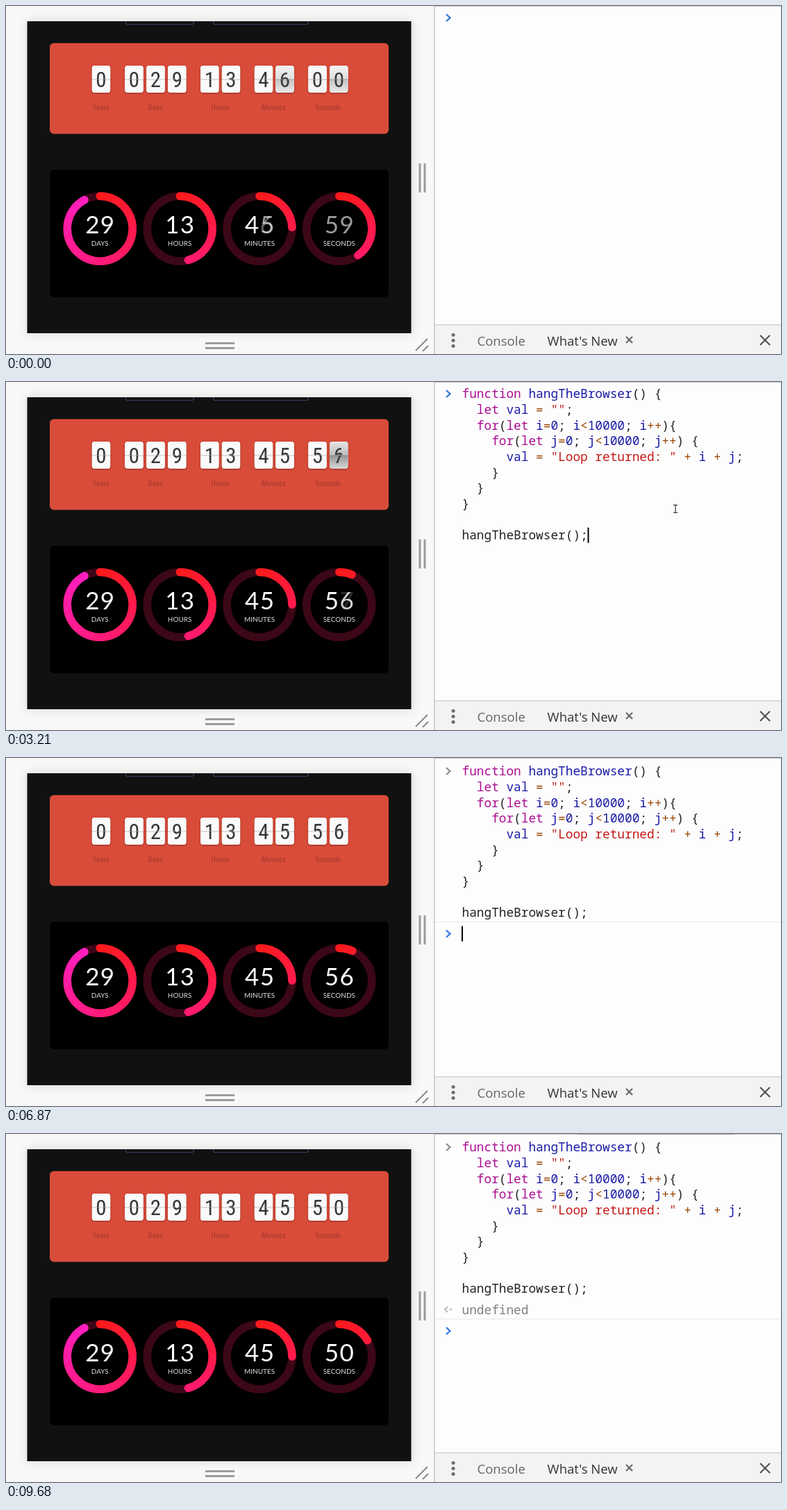
Write an HTML page with a canvas that moves like this. It is 1116x502 px and loops after 9720 ms.

```html
<!DOCTYPE html>
<html lang="en">
<head>
<meta charset="utf-8">
<title>Countdown and console</title>
<style>
  html, body { margin: 0; height: 100%; overflow: hidden; background: #f8f8f6; }
  canvas { display: block; }
</style>
</head>
<body>
<canvas id="stage" width="1116" height="502"></canvas>
<script>
const ctx = document.getElementById('stage').getContext('2d');
const LOOP = 9720;
const FADE = 380;        // ring and digit cross-fade
const FLIP = 360;        // one card flip
const HINGE = 105.5;

// When the countdown changes, and the seconds it then shows.
const TICKS = [[-230, 59], [860, 58], [1890, 57], [2900, 56], [7030, 52], [7930, 51], [8940, 50]];

// Console events.
const FOCUS = 1250, PASTE = 2000, ENTER = 3580, RETURN = 7000;

const CODE = `function hangTheBrowser() {
  let val = "";
  for(let i=0; i<10000; i++){
    for(let j=0; j<10000; j++) {
      val = "Loop returned: " + i + j;
    }
  }
}

hangTheBrowser();`.split('\n');
const LINE = 22.67;
const MONO = '17.77px "Noto Sans Mono", monospace';
const NARROW = '"Roboto Condensed", "Open Sans Condensed", "Liberation Sans Narrow", "Noto Sans Condensed", Roboto, sans-serif';

// Groups: string, keyword, variable or number, operator; the rest is plain.
const TOKEN = /("[^"]*")|\b(function|let|for)\b|(\b(?:val|i|j|\d+)\b|hangTheBrowser(?=\(\) \{))|([=<+]+)|\w+|[^\s]/g;
const TOKEN_COLORS = ['#c41a16', '#ab0d90', '#1a1aa6', '#994500'];

const clamp = v => Math.min(1, Math.max(0, v));
const mix = (a, b, p) => a + (b - a) * p;
const easeInOut = p => p < .5 ? 4 * p ** 3 : 1 - (2 - 2 * p) ** 3 / 2;
const digits = n => String(n).padStart(2, '0');

function box(x, y, w, h, r, fill) {
  ctx.fillStyle = fill;
  ctx.beginPath();
  ctx.roundRect(x, y, w, h, r);
  ctx.fill();
}

function line(points, color, width = 1) {
  ctx.strokeStyle = color;
  ctx.lineWidth = width;
  ctx.beginPath();
  points.forEach(([x, y]) => ctx.lineTo(x, y));
  ctx.stroke();
}

function text(str, x, y, font, color, align = 'left') {
  ctx.font = font;
  ctx.fillStyle = color;
  ctx.textAlign = align;
  ctx.fillText(str, x, y);
}

function narrowText(str, x, y, size, color) {
  ctx.fontStretch = 'condensed';
  text(str, x, y, `condensed ${size}px ${NARROW}`, color, 'center');
  ctx.fontStretch = 'normal';
}

function shadow(color, blur, y = 0) {
  ctx.shadowColor = color;
  ctx.shadowBlur = blur;
  ctx.shadowOffsetY = y;
}

function countdownAt(t) {
  const i = TICKS.findLastIndex(([at]) => at <= t);
  return {
    age: t - TICKS[i][0],
    now: { min: 45, sec: TICKS[i][1] },
    old: i ? { min: 45, sec: TICKS[i - 1][1] } : { min: 46, sec: 0 }
  };
}

function drawPage() {
  ctx.fillStyle = '#f8f8f6';
  ctx.fillRect(0, 0, 617, 502);
  shadow('rgba(0,0,0,.14)', 14);
  box(30.5, 22, 553, 450, 0, '#111');
  shadow('transparent', 0);

  // Lower edges of two outlined buttons scrolled under the top.
  ctx.save();
  ctx.beginPath();
  ctx.rect(30, 22, 554, 20);
  ctx.clip();
  ctx.strokeStyle = '#3a3a60';
  ctx.lineWidth = 1.2;
  for (const [x, w] of [[172, 98.5], [298.5, 137]]) {
    ctx.beginPath();
    ctx.roundRect(x, 0, w, 26.5, 3);
    ctx.stroke();
  }
  ctx.restore();

  box(63, 53.5, 488, 131, 6, '#da4c3a');
  box(63, 236, 488, 184, 6, '#000');

  for (const d of [0, 7]) {
    box(594.5 + d, 227, 3, 42, 0, '#9b9b9b');
    box(287, 485 + d, 42, 3, 0, '#9b9b9b');
  }
  line([[590, 497], [607, 480]], '#888', 2);
  line([[600, 498], [608, 490]], '#888', 2);
}

// One half of a card, folded towards the hinge by `fold` (1 = flat).
function cardHalf(char, x, top, fold, shade) {
  ctx.save();
  ctx.translate(x, HINGE);
  ctx.scale(1, fold);
  ctx.beginPath();
  ctx.rect(-13.5, top ? -20 : 0, 27, 20);
  ctx.clip();
  box(-13.2, -19.5, 26.4, 39, 4, '#fafafa');
  narrowText(char, 0, 11.5, 31, '#383838');
  if (shade > 0) {
    const g = ctx.createLinearGradient(0, 0, 0, top ? -20 : 20);
    g.addColorStop(0, `rgba(60,60,60,${shade})`);
    g.addColorStop(1, `rgba(60,60,60,${shade * .3})`);
    box(-13.2, -19.5, 26.4, 39, 4, g);
  }
  ctx.restore();
}

function card(x, now, old, age) {
  const p = now === old ? 1 : easeInOut(clamp(age / FLIP));
  const shade = p < 1 ? .55 * Math.sqrt(Math.sin(Math.PI * p)) : 0;
  const flap = Math.abs(Math.cos(Math.PI * p));
  shadow('rgba(0,0,0,.35)', 3, 1);
  box(x - 13.2, HINGE - 19.5, 26.4, 39, 4, '#fafafa');
  shadow('transparent', 0);
  cardHalf(now, x, true, 1, shade * .6);
  cardHalf(p < 1 ? old : now, x, false, 1, shade);
  if (p < .5) cardHalf(old, x, true, flap, shade * .5);
  else if (p < 1) cardHalf(now, x, false, flap, shade * .4);
  line([[x - 14, HINGE + .5], [x + 14, HINGE + .5]], 'rgba(70,70,70,.3)');
}

function drawFlipClock({ age, now, old }) {
  const groups = [
    ['Years', 136.5, [137], '0', '0'],
    ['Days', 215, [184.5, 215.5, 246.3], '029', '029'],
    ['Hours', 308, [293.3, 324], '13', '13'],
    ['Minutes', 385.5, [371, 401.5], digits(now.min), digits(old.min)],
    ['Seconds', 463.5, [448.5, 479.3], digits(now.sec), digits(old.sec)]
  ];
  for (const [label, x, places, fresh, stale] of groups) {
    places.forEach((cx, i) => {
      const delay = i < places.length - 1 ? 200 : 130;
      card(cx, fresh[i], stale[i], age - delay);
    });
    narrowText(label, x, 150, 11, '#a03a2e');
  }
}

function ring(cx, label, now, old, share, p) {
  const cy = 321.2, r = 47, start = -Math.PI / 2;
  const arc = (angle, style) => {
    ctx.strokeStyle = style;
    ctx.lineWidth = 11.5;
    ctx.beginPath();
    ctx.arc(cx, cy, r, start, start + angle);
    ctx.stroke();
  };
  arc(2 * Math.PI, '#3c0716');
  // The gradient starts before the round cap so that the cap stays red.
  const g = ctx.createConicGradient(start - .2, cx, cy);
  g.addColorStop(0, '#ff1a1a');
  g.addColorStop(.06, '#ff1a20');
  g.addColorStop(.5, '#ff1a74');
  g.addColorStop(1, '#ff1fc8');
  ctx.lineCap = 'round';
  arc(share * 2 * Math.PI, g);
  ctx.lineCap = 'butt';

  const fresh = digits(now), stale = digits(old);
  const tensChange = fresh[0] !== stale[0];
  [-10.8, 10.8].forEach((dx, i) => {
    const put = (char, alpha) => {
      ctx.globalAlpha = alpha;
      text(char, cx + dx, 327.5, '35px Lato, sans-serif', '#fff', 'center');
    };
    if (fresh[i] === stale[i]) return put(fresh[i], 1);
    if (!tensChange) put(stale[i], 1 - p);
    put(fresh[i], p);
  });
  ctx.globalAlpha = 1;
  text(label, cx, 345.5, '10px Lato, sans-serif', '#ddd', 'center');
}

function drawRings({ age, now, old }) {
  const p = clamp(age / FADE);
  const sixtieth = n => (60 - n) / 60;
  ring(135.2, 'DAYS', 29, 29, 332 / 360, 1);
  ring(250.2, 'HOURS', 13, 13, 11 / 24, 1);
  ring(365, 'MINUTES', now.min, old.min, mix(sixtieth(old.min), sixtieth(now.min), p), p);
  ring(479.8, 'SECONDS', now.sec, old.sec, mix(sixtieth(old.sec), sixtieth(now.sec), p), p);
}

function chevron(y, color) {
  line([[634, y - 5], [639.5, y], [634, y + 5]], color, 2.3);
}

function drawCode(baseline) {
  ctx.font = MONO;
  const advance = ctx.measureText('0').width;
  CODE.forEach((row, i) => {
    for (const m of row.matchAll(TOKEN)) {
      const kind = m.slice(1).findIndex(Boolean);
      text(m[0], 656.5 + m.index * advance, baseline + i * LINE, MONO, TOKEN_COLORS[kind] || '#222');
    }
  });
}

function caret(t, since, x, y) {
  if ((t - since) % 1000 < 500) box(x, y, 2, 22, 0, '#000');
}

function cross(x, y, r, color) {
  line([[x - r, y - r], [x + r, y + r]], color, 2.2);
  line([[x - r, y + r], [x + r, y - r]], color, 2.2);
}

function drawConsole(t) {
  ctx.fillStyle = '#fdfdfe';
  ctx.fillRect(617, 0, 499, 502);

  if (t < ENTER) {
    chevron(17, '#2f76e0');
    if (t >= PASTE) {
      drawCode(23.4);
      caret(t, PASTE, 837.5, 210);
    } else if (t >= FOCUS) caret(t, FOCUS, 656, 6);
  } else {
    chevron(19, '#8c8c8c');
    drawCode(25.2);
    const done = t >= RETURN;
    const rule = done ? 267 : 236.5;
    line([[618, rule], [1116, rule]], '#e9e9e6');
    if (done) {
      line([[636, 249], [632, 253], [636, 257]], '#b5b5b5', 1.8);
      box(639, 252, 3, 2.4, 0, '#b5b5b5');
      text('undefined', 656.5, 260, MONO, '#808080');
    }
    chevron(done ? 284 : 253.5, '#2f76e0');
    caret(t, done ? RETURN : ENTER, 656, done ? 273 : 242.5);
  }

  box(617, 460, 499, 42, 0, '#f3f3f1');
  line([[617, 459.8], [1116, 459.8]], '#cbcbcb', 1.3);
  line([[617, .5], [1116, .5]], '#ccc');
  line([[617, 0], [617, 502]], '#c6c6c6', 1.5);
  if (t > 8600) line([[823, .5], [1049, .5]], '#a5a5a5');

  for (const y of [474.5, 482.5, 490.5]) box(641.5, y - 2.5, 5, 5, 2.5, '#6c6c6c');
  const tabFont = '18.5px "Open Sans", sans-serif';
  text('Console', 678.5, 489.5, tabFont, '#666');
  text("What's New", 779.5, 489.5, tabFont, '#333');
  cross(897.5, 481.5, 4.5, '#666');
  cross(1093, 482, 7, '#555');
}

function beam(x, y) {
  line([[x, y - 5], [x, y + 5]], '#333', 1.2);
  for (const dy of [-5.5, 5.5]) line([[x - 3, y + dy], [x + 3, y + dy]], '#333', 1.2);
}

function arrow(x, y) {
  ctx.save();
  ctx.translate(x, y);
  ctx.beginPath();
  [[0, 0], [0, 13], [3, 10], [5, 14.5], [7, 13.5], [5, 9.5], [9, 9.5]].forEach(([a, b]) => ctx.lineTo(a, b));
  ctx.closePath();
  ctx.fillStyle = '#fff';
  ctx.fill();
  ctx.strokeStyle = '#333';
  ctx.lineWidth = 1;
  ctx.stroke();
  ctx.restore();
}

function drawPointer(t) {
  const glide = (from, to, t0, t1) => {
    const p = easeInOut(clamp((t - t0) / (t1 - t0)));
    return [mix(from[0], to[0], p), mix(from[1], to[1], p)];
  };
  if (t > 300 && t < 2150) beam(...glide([1090, 510], [725.5, 15.5], 300, 1100));
  else if (t >= 2150 && t < ENTER) beam(...glide([725.5, 15.5], [964, 183], 2150, 3000));
  else if (t > 7300 && t < 8000) {
    const p = clamp((t - 7300) / 600), q = 1 - p;
    const x = q * q * 964 + 2 * p * q * 1100 + p * p * 1033;
    const y = q * q * 183 + 2 * p * q * 70 - p * p * 3 - Math.max(0, t - 7900) * .15;
    if (y > 5) beam(x, y); else arrow(x, y);
  }
}

function frame(now) {
  let t = now % LOOP;
  if (t > 70 && t < 240) t = 70;   // a short stall after the first tick
  const countdown = countdownAt(t);
  drawPage();
  drawFlipClock(countdown);
  drawRings(countdown);
  drawConsole(t);
  drawPointer(t);
  requestAnimationFrame(frame);
}

requestAnimationFrame(frame);
</script>
</body>
</html>
```
